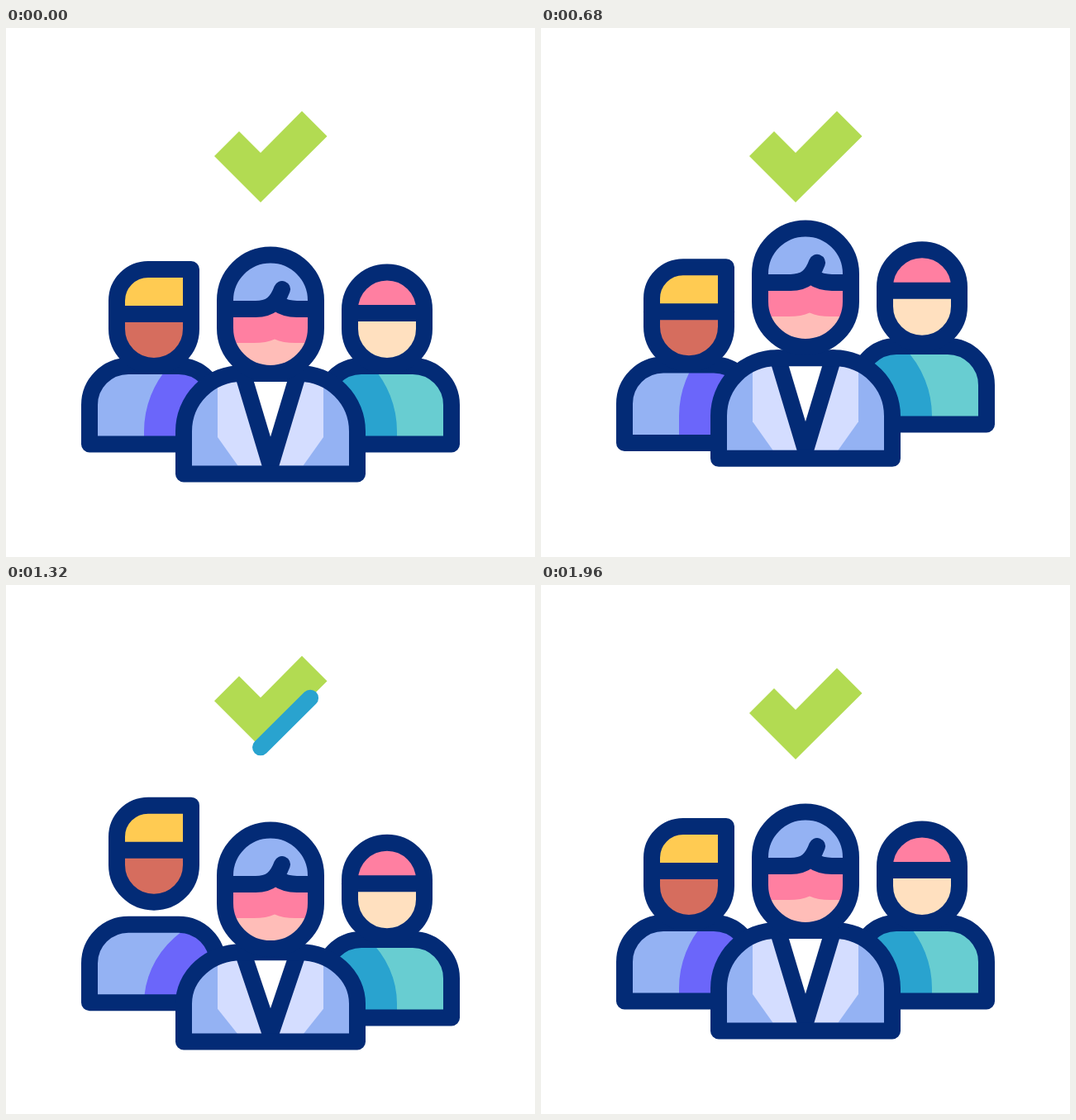
An HTML page with a canvas that plays this animation: 640x640 px, repeating every 2240 ms.

```html
<!DOCTYPE html>
<html lang="en">
<head>
<meta charset="utf-8">
<title>Team approval</title>
<style>
  html, body { margin: 0; width: 100%; height: 100%; overflow: hidden; background: #fff; }
  canvas { display: block; width: 100vw; height: 100vh; object-fit: contain; }
</style>
</head>
<body>
<canvas id="stage" width="640" height="640"></canvas>
<script>
const ctx = document.getElementById('stage').getContext('2d');
const LOOP = 2240, STEP = 40, LINE = 20;
const NAVY = '#032b76', BLUE = '#94b2f3', ICE = '#d4ddff', PURPLE = '#6b66fa',
  PINK = '#ff7fa1', BLUSH = '#ffbdb8', YELLOW = '#ffcb52', BROWN = '#d66d5e',
  PEACH = '#ffe0bf', TEAL = '#68cdd1', CYAN = '#29a3cf', GREEN = '#b2db52';

const smooth = p => (1 - Math.cos(Math.PI * p)) / 2;
const easeOut = p => 1 - (1 - p) ** 3;
const ramp = (t, from, to, ease = smooth) =>
  ease(Math.min(1, Math.max(0, (t - from) / (to - from))));
const bump = (t, middle, reach) => 1 - ramp(Math.abs(t - middle), 0, reach);

// Crouch, rise to the peak, fall to the low point, settle at rest.
const CROUCH = 200, FALL = 480, SETTLE = 320;
const hop = (start, top, peak, low, crouch = 0) => t =>
  crouch * ramp(t, CROUCH, start) +
  (peak - crouch) * ramp(t, start, top) +
  (low - peak) * ramp(t, top, top + FALL) -
  low * ramp(t, top + FALL, top + FALL + SETTLE);

const torso = (x0, x1, top, bottom, r) => new Path2D(
  `M${x0} ${bottom}V${top + r}A${r} ${r} 0 0 1 ${x0 + r} ${top}H${x1 - r}` +
  `A${r} ${r} 0 0 1 ${x1} ${top + r}V${bottom}Z`);
const pill = (cx, top, bottom, r) => new Path2D(
  `M${cx - r} ${top + r}a${r} ${r} 0 0 1 ${2 * r} 0V${bottom - r}a${r} ${r} 0 0 1 ${-2 * r} 0Z`);

const FLOOR = 539.5;
const leader = {
  body: torso(215, 425, 418, FLOOR, 70),
  lapels: new Path2D('M256 400V495L280.5 529.5H359.5L384 495V400Z'),
  collar: new Path2D('M286.5 418L320 529.5L353.5 418'),
  head: pill(320, 274.5, 418, 55),
  shade: new Path2D('M255 330H385V381H350Q335 381 325 376.5Q315 381 300 381H255Z'),
  fringe: new Path2D('M265 340H302C320 340 328 332 334 316M328 333Q338 340 352 340H375'),
  headY: hop(440, 895, -97, 26, 45),
  bodyY: hop(440, 850, -44, 13, 25),
  squash: t => 1 - .11 * (bump(t, 440, 245) + bump(t, 1320, 340))
};
const left = {
  body: torso(101, 256, 409, 503.5, 47), shirt: BLUE, shade: PURPLE,
  head: new Path2D('M224 292H172A38 38 0 0 0 134 330V364A45 45 0 0 0 224 364Z'),
  x: 134, brow: 346, hair: YELLOW, skin: BROWN,
  headY: hop(625, 1078, -77, 25),
  bodyY: hop(635, 1012, -44, 20)
};
const right = {
  body: torso(383, 539, 409, 503.5, 47), shirt: TEAL, shade: CYAN,
  head: pill(461, 295.5, 409, 45),
  x: 416, brow: 345, hair: PINK, skin: PEACH,
  headY: hop(540, 952, -105, 34),
  bodyY: hop(488, 928, -60, 27)
};
const tick = new Path2D('M308 211L388.5 131L358 100.5L308 151L282 125L252 155Z');
const TICK_LENGTH = 386;

function moved(path, dy, scale = 1) {
  const result = new Path2D();
  result.addPath(path, { a: 1, b: 0, c: 0, d: scale, e: 0, f: dy + FLOOR * (1 - scale) });
  return result;
}
function fill(path, color) {
  ctx.fillStyle = color;
  ctx.fill(path);
}
function stroke(path, color = NAVY, width = LINE) {
  ctx.strokeStyle = color;
  ctx.lineWidth = width;
  ctx.stroke(path);
}
function inside(path, draw) {
  ctx.save();
  ctx.clip(path);
  draw();
  ctx.restore();
}
function shifted(dy, draw) {
  ctx.save();
  ctx.translate(0, dy);
  draw();
  ctx.restore();
}
function fillAbove(x, y, width, color) {
  ctx.fillStyle = color;
  ctx.fillRect(x, y - width, width, width);
}

function drawSide(person, t, leaderBody) {
  const { head, x, brow } = person;
  const body = moved(person.body, person.bodyY(t));
  fill(body, person.shirt);
  inside(body, () => stroke(leaderBody, person.shade, 96));
  stroke(body);
  shifted(person.headY(t), () => {
    fill(head, person.skin);
    inside(head, () => fillAbove(x, brow, 90, person.hair));
    stroke(new Path2D(`M${x} ${brow}h90`));
    stroke(head);
  });
}

function drawLeader(t, place) {
  const body = place(leader.body), collar = place(leader.collar);
  fill(body, BLUE);
  inside(body, () => {
    fill(place(leader.lapels), ICE);
    fill(collar, '#fff');
  });
  stroke(collar);
  stroke(body);
  shifted(leader.headY(t), () => {
    fill(leader.head, BLUSH);
    inside(leader.head, () => {
      fill(leader.shade, PINK);
      fillAbove(255, 340, 130, BLUE);
    });
    stroke(leader.fringe);
    stroke(leader.head);
  });
}

// The outline grows both ways from its middle, then retracts to its start.
function drawCheck(t) {
  const grow = ramp(t, 895, 1220);
  const start = (1 - grow) / 2;
  const end = Math.min((1 + grow) / 2, 1 - ramp(t, 1220, 1365));
  const y = -53 * ramp(t, 720, 1060, easeOut) + 79 * ramp(t, 1060, 1590) - 26 * ramp(t, 1590, 1880);
  shifted(y, () => {
    fill(tick, GREEN);
    if (end - start < .01) return;
    ctx.setLineDash([(end - start) * TICK_LENGTH, TICK_LENGTH]);
    ctx.lineDashOffset = -start * TICK_LENGTH;
    stroke(tick, CYAN);
  });
}

function drawRays(t) {
  const from = ramp(t, 1080, 1260), to = ramp(t, 860, 1060, easeOut);
  if (to - from < .01) return;
  for (const side of [-1, 1]) {
    for (const row of [-1, 0, 1]) {
      const bend = Math.abs(row);
      const at = p => {
        const reach = 122 - 9 * bend + (35 - 15 * bend) * p;
        return `${320 + side * reach} ${99.3 - 5.3 * side + row * (30 + 9.5 * p)}`;
      };
      stroke(new Path2D(`M${at(from)}L${at(to)}`), YELLOW);
    }
  }
}

function render(t) {
  ctx.fillStyle = '#fff';
  ctx.fillRect(0, 0, 640, 640);
  ctx.lineCap = ctx.lineJoin = 'round';
  const place = path => moved(path, leader.bodyY(t), leader.squash(t));
  const leaderBody = place(leader.body);
  drawSide(left, t, leaderBody);
  drawSide(right, t, leaderBody);
  drawLeader(t, place);
  drawCheck(t);
  drawRays(t);
}

let origin;
function frame(now) {
  origin ??= now;
  const t = (now - origin) % LOOP;
  render(Math.floor(t / STEP) * STEP);
  requestAnimationFrame(frame);
}
render(0);
requestAnimationFrame(frame);
</script>
</body>
</html>
```
